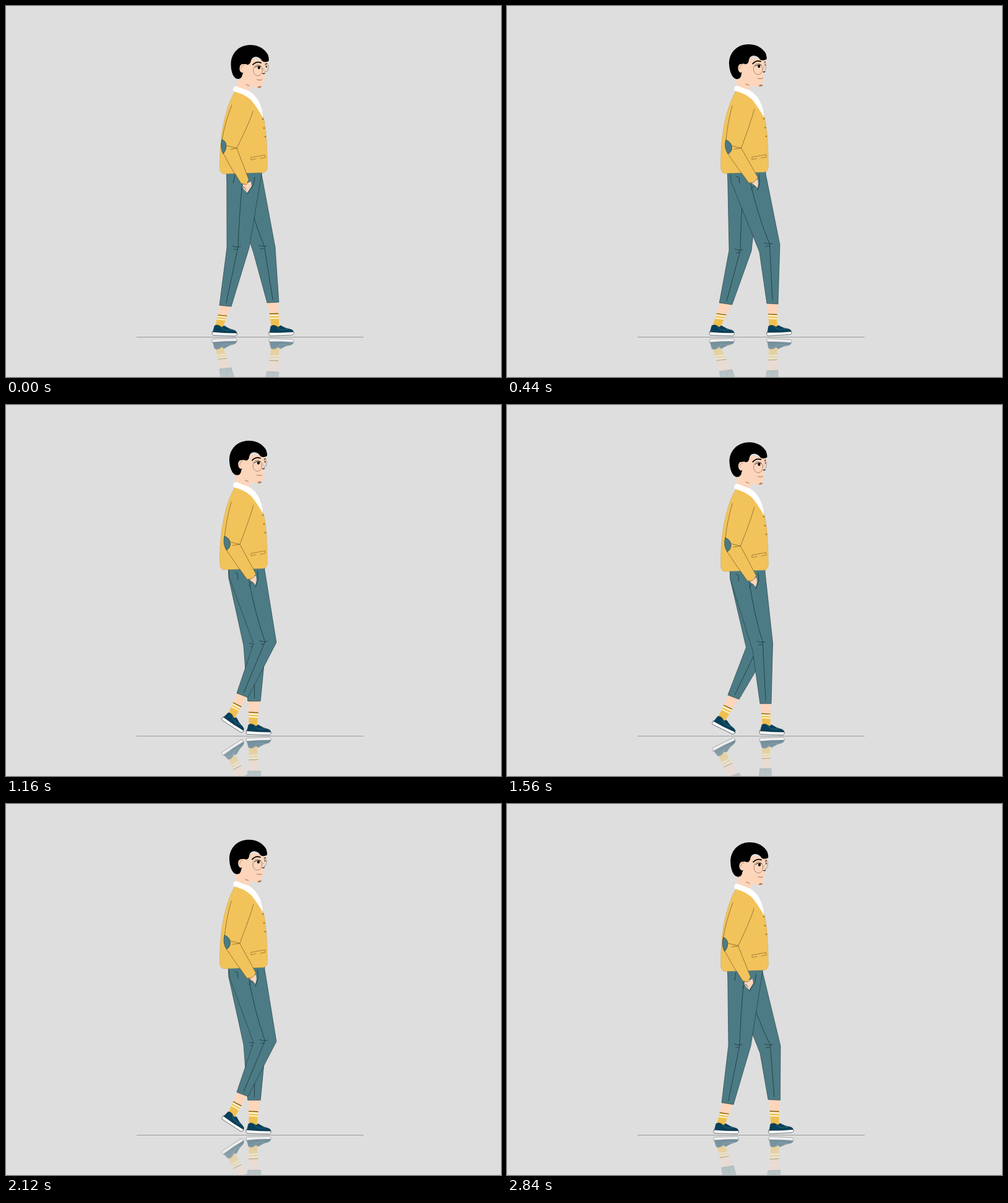
Recreate the animation shown at these times as an HTML page with a canvas. Size 800 by 600 pixels, loop 2880 ms.

```html
<!DOCTYPE html>
<html lang="en">
<head>
<meta charset="utf-8">
<title>Walk cycle</title>
<style>
  html, body { margin: 0; width: 100%; height: 100%; overflow: hidden; background: #dedede; }
  canvas { display: block; width: 800px; height: 600px; }
</style>
</head>
<body>
<canvas id="stage" width="800" height="600"></canvas>
<script>
const ctx = document.getElementById('stage').getContext('2d');
const CYCLE = 960, STEP = 40, GROUND = 535.5;
const COLOR = {
  bg: '#dedede', pants: '#4c7b85', seam: '#1b3439', skin: '#fdd5ba', sock: '#efc04e',
  cream: '#fff3d6', shoe: '#06415b', wool: '#f2c35b', thread: '#73581f', black: '#000'
};

// time, hip back x, hip front x, knee back, knee front, cuff back, cuff front, heel, foot angle
const LEG = [
  [0, 356, 413, 357, 391, 393, 391, 345, 484, 364, 486, 333, 532, 2],
  [120, 360, 417, 385.5, 387, 423, 388, 359.7, 472, 376.4, 479, 337.5, 515.5, 26],
  [200, 360, 418, 400, 386, 437, 384, 373, 466, 391, 473, 348, 508.5, 33],
  [440, 361, 418, 408, 398, 441, 386, 420, 481, 438, 482, 420, 533, -3],
  [480, 360, 418, 399, 394, 434, 385, 420, 483, 437.5, 482, 421.8, 533, -2],
  [600, 360, 417, 397, 397, 429.5, 385, 409, 483, 427, 483, 408, 532, 2],
  [680, 359, 418, 383, 384, 419, 383, 391, 482, 410, 482, 388.6, 532, 2],
  [920, 356, 413, 358, 390, 394, 391, 347, 483, 366, 486, 334, 532, 1.5]
];
// time, arm sway, head tilt
const BODY = [
  [0, 0, 0], [200, 0.88, 2.1], [440, 1, 3.8], [600, 0.8, 3.3], [920, 0.1, 1.9]
];

const mix = (a, b, f) => a + (b - a) * f;
const mixPt = (a, b, f) => [mix(a[0], b[0], f), mix(a[1], b[1], f)];

// Smooth periodic interpolation through unevenly spaced keys
function sample(keys, time) {
  const n = keys.length;
  const t = ((time % CYCLE) + CYCLE) % CYCLE;
  let i = n - 1;
  while (keys[i][0] > t) i--;
  const row = k => keys[(k + n) % n];
  const at = k => row(k)[0] + CYCLE * Math.floor(k / n);
  const slope = (k, c) => {
    const before = at(k) - at(k - 1), after = at(k + 1) - at(k);
    const d0 = (row(k)[c] - row(k - 1)[c]) / before;
    const d1 = (row(k + 1)[c] - row(k)[c]) / after;
    return (before * d1 + after * d0) / (before + after);
  };
  const h = at(i + 1) - at(i), u = (t - at(i)) / h, v = 1 - u;
  return row(i).slice(1).map((a, j) => {
    const c = j + 1, b = row(i + 1)[c];
    return a * (1 + 2 * u) * v * v + b * u * u * (3 - 2 * u)
      + h * (slope(i, c) * u * v * v - slope(i + 1, c) * u * u * v);
  });
}

function paint(path, fill, stroke, width = 0.7) {
  if (fill) { ctx.fillStyle = fill; ctx.fill(path); }
  if (stroke) { ctx.strokeStyle = stroke; ctx.lineWidth = width; ctx.stroke(path); }
}
const shape = (d, fill, stroke, width) => paint(new Path2D(d), fill, stroke, width);
function poly(points, fill, stroke, width, open) {
  const path = new Path2D();
  points.forEach(p => path.lineTo(p[0], p[1]));
  if (!open) path.closePath();
  paint(path, fill, stroke, width);
}
const line = (points, stroke, width) => poly(points, null, stroke, width, true);
function oval(x, y, rx, ry, fill, stroke, width) {
  const path = new Path2D();
  path.ellipse(x, y, rx, ry, 0, 0, Math.PI * 2);
  paint(path, fill, stroke, width);
}

function legPose(time, far) {
  const [hb, hf, kbx, kby, kfx, kfy, cbx, cby, cfx, cfy, hx, hy, angle] = sample(LEG, time);
  const widen = (x, k) => far ? 394 + (x - 394) * k : x;
  const kx = far ? 1 : 0, ky = far ? 5 : 0, cy = far ? -3 : 0;
  return {
    hipBack: hb, hipFront: far ? hf - 5 : hf,
    kneeBack: [kbx + kx, kby + ky], kneeFront: [kfx + kx, kfy + ky],
    cuffBack: [widen(cbx, 1.08), cby + cy], cuffFront: [widen(cfx, 1.08), cfy + cy],
    heel: [widen(hx, 1.116), Math.min(hy, 533)], angle: angle * Math.PI / 180
  };
}

function drawFoot({ heel, angle, cuffBack, cuffFront }) {
  const cos = Math.cos(angle), sin = Math.sin(angle);
  const place = (x, y) => [heel[0] + x * cos - y * sin, heel[1] + x * sin + y * cos];
  const back = place(4.5, -13), front = place(17, -12);
  const top = [mixPt(cuffBack, cuffFront, 0.04), mixPt(cuffBack, cuffFront, 0.92)];
  const band = (a, b, fill) => poly([
    mixPt(top[0], back, a), mixPt(top[1], front, a),
    mixPt(top[1], front, b), mixPt(top[0], back, b)
  ], fill);
  band(-0.05, 1, COLOR.skin);
  band(0.43, 1, COLOR.sock);
  band(0.43, 0.46, COLOR.thread);
  band(0.48, 0.54, COLOR.cream);
  band(0.60, 0.65, COLOR.cream);

  ctx.save();
  ctx.translate(heel[0], heel[1]);
  ctx.rotate(angle);
  shape('M1-4L3.500-15Q8-18 13-14.500L16-13Q19-17 21-14.500Q27-10.500 35-9Q39.500-8 40-4Z', COLOR.shoe, '#0a2433', 0.5);
  shape('M.3-5Q20-3.500 40-4.500Q41 0 37 .4L2 .4Q-1 0 .3-5Z', '#fff', '#1a2c36', 0.6);
  shape('M13-14Q16-8.500 24-8.500L31-9.500', null, '#5f8596', 0.5);
  ctx.restore();
}

function drawLeg(leg, bodyY, sway) {
  const top = 262 + bodyY;
  drawFoot(leg);
  poly([[leg.hipBack, top], [leg.hipBack + 0.8, top + 22], leg.kneeBack, leg.cuffBack,
    leg.cuffFront, leg.kneeFront, [leg.hipFront, top + 10], [leg.hipFront, top]],
    COLOR.pants, COLOR.seam, 0.6);
  const [kx] = mixPt(leg.kneeBack, leg.kneeFront, 0.5), ky = leg.kneeFront[1] - 1;
  const hip = [mix(leg.hipBack, leg.hipFront, 0.45 + 0.13 * sway), 289 + bodyY];
  const cuff = mixPt(leg.cuffBack, leg.cuffFront, 0.52);
  const bow = Math.abs(kx - hip[0]) * 0.1 + 1;
  const crease = new Path2D();
  crease.moveTo(...hip);
  crease.quadraticCurveTo(mix(hip[0], kx, 0.5) - bow, mix(hip[1], ky, 0.52), kx, ky);
  crease.lineTo(...mixPt([kx, ky], cuff, 0.95));
  paint(crease, null, COLOR.seam, 0.8);
  line([[kx - 9, ky - 2], [kx - 2, ky], [kx + 4, ky - 1]], COLOR.seam, 0.8);
  line([[kx - 7, ky + 4], [kx - 1, ky + 3.5]], COLOR.seam, 0.7);
}

function drawHead(tilt) {
  ctx.save();
  ctx.translate(388 - 0.6 * tilt, 128);
  ctx.rotate(-tilt * Math.PI / 180);
  ctx.translate(-388, -128);
  shape('M374 108L373 134L392 142L396 131Z', COLOR.skin);
  shape('M382 84L422 88Q424 97 420 103L418.500 111Q419 116 417 121Q416 131 409 132.500Q400 133 389 126L376 116Z', COLOR.skin);
  shape('M388 127L393 129', null, '#8a5a42', 0.8);
  shape('M375 118Q381 118 382 111L384 106Q378 102 380 96Q385 92 390 95Q395 95 396 88Q398 82 404 82Q411 83 414 89Q419 92 424.500 89Q425.500 86 423.500 79C418 69 408 63 394.500 63C376 63 363.500 77 363.500 94C363.500 107 368 118 375 118Z', COLOR.black);
  oval(382, 101, 4.6, 7, COLOR.skin);
  shape('M385 96Q380 96 380 102', null, '#9b6a50', 0.6);

  // Features slide against the tilt while the far lens narrows
  ctx.translate(0.7 * tilt, 0);
  shape('M399 95Q405 89 412 92', null, COLOR.black, 1.8);
  shape('M402.500 99Q407 95.500 412.500 98', null, COLOR.black, 0.9);
  oval(408.8, 99.8, 2.1, 2.4, COLOR.black);
  oval(407, 104, 7.4, 9, null, '#5b4035', 0.5);
  shape('M415 109Q417 110.500 418 108.500', null, COLOR.black, 1.1);
  shape('M405.500 119Q409 121 413.500 119.500', null, '#8b493b', 0.7);
  shape('M406 131Q410 128.500 413 130Q412 132.500 408 132.500Z', '#a9775a');
  ctx.translate(417, 0);
  ctx.scale(1 - 0.14 * tilt, 1);
  shape('M2 94L5 93', null, COLOR.black, 1.2);
  oval(3.7, 98, 0.9, 1.7, COLOR.black);
  shape('M-2.500 102Q-1 100 .5 102M1 96Q7 90 7 100Q6.500 108 1 106', null, '#5b4035', 0.5);
  ctx.restore();
}

function drawHand(sway) {
  const at = (x0, y0, x1, y1) => [mix(x0, x1, sway), mix(y0, y1, sway)];
  poly([at(383, 288, 393, 285), at(396, 284, 405, 280), at(397, 291, 406, 288),
    at(390, 302, 405, 295), at(382, 294, 398, 289)], COLOR.skin);
  line([at(402, 277, 407, 273), at(400, 289, 408.5, 286), at(390, 304, 405, 299)], COLOR.seam, 0.8);
  line([at(380, 298, 394, 298), at(384, 292, 399, 291), at(388, 297, 402, 293)], COLOR.seam, 0.7);
  line([at(369, 274, 370, 276), at(369, 278, 375, 278), at(367, 286, 376, 287)], COLOR.seam, 0.8);
}

function drawTorso(sway) {
  shape('M370 138C355 164 345 205 345.500 262Q346 271 352 271.500L380 270.500L416 269.500Q422 268 422.500 261C422 230 421 195 415 177C407 158 394 142 370 138Z', COLOR.wool, '#b08a35', 0.3);
  shape('M368 138Q365 131 372 129.500Q383 134 392 137Q405 144 411 160Q415 171 415.500 181Q406 164 396 152Q385 142 368 138Z', '#fff');
  shape('M396 249L396 245L418.500 241L419 245L411 246.500M404 247L397 249', null, COLOR.thread, 0.6);
  [[415, 183], [417, 197.5], [419, 211.5]].forEach(([x, y]) => oval(x, y, 1, 1, '#a98430', COLOR.thread, 0.4));

  const at = (x0, y0, x1, y1) => [mix(x0, x1, sway), mix(y0, y1, sway)];
  const elbow = at(373, 230, 378.5, 230.5);
  const cuffBack = at(380, 287, 391, 287), cuffFront = at(392, 280, 405.5, 278);
  const tip = at(388, 289, 398, 286);
  poly([elbow, at(352, 239, 357, 240), cuffBack, tip, cuffFront], COLOR.wool);
  line([at(351, 238, 357, 240), at(364, 262, 374, 264), cuffBack, tip, at(393, 284, 405, 280)], COLOR.thread);

  const seam = new Path2D();
  seam.moveTo(...at(365, 160, 364, 162));
  seam.quadraticCurveTo(...at(353, 192, 356, 192), ...at(349, 217, 354, 218));
  seam.moveTo(...at(399, 170, 400, 167));
  seam.quadraticCurveTo(...at(396, 183, 394, 189), ...elbow);
  seam.lineTo(...cuffFront);
  seam.moveTo(...at(357, 226, 364, 227));
  seam.lineTo(...elbow);
  seam.moveTo(...at(363, 232, 367, 232));
  seam.lineTo(...elbow);
  paint(seam, null, COLOR.thread);

  const patch = new Path2D(), top = at(349, 216, 353.5, 217.5);
  patch.moveTo(...top);
  patch.bezierCurveTo(...at(358, 219, 365, 220), ...at(358, 231, 367, 236), ...at(351, 239, 357, 240));
  patch.quadraticCurveTo(...at(345.5, 229, 350.5, 230), ...top);
  paint(patch, COLOR.pants, COLOR.seam, 0.6);
}

function draw(time) {
  const [sway, tilt] = sample(BODY, time);
  const bodyY = -2.9 * (1 - Math.cos((time - 15) / CYCLE * 4 * Math.PI));
  const near = legPose(time, false), far = legPose(time + CYCLE / 2, true);
  const legs = () => {
    drawLeg(far, bodyY, 0.4);
    drawLeg(near, bodyY, sway);
  };

  ctx.fillStyle = COLOR.bg;
  ctx.fillRect(0, 0, 800, 600);

  ctx.save();
  ctx.beginPath();
  ctx.rect(0, GROUND, 800, 600 - GROUND);
  ctx.clip();
  ctx.translate(0, GROUND * 2);
  ctx.scale(1, -1);
  legs();
  ctx.restore();
  const fade = ctx.createLinearGradient(0, GROUND, 0, 600);
  fade.addColorStop(0, 'rgba(222,222,222,.46)');
  fade.addColorStop(1, 'rgba(222,222,222,.76)');
  ctx.fillStyle = fade;
  ctx.fillRect(0, GROUND, 800, 65);

  line([[211, GROUND], [577.5, GROUND]], '#999', 1);
  legs();
  ctx.save();
  ctx.translate(0, bodyY);
  drawHand(sway);
  drawHead(tilt);
  drawTorso(sway);
  ctx.restore();
}

ctx.lineJoin = ctx.lineCap = 'round';
function tick() {
  draw(Math.floor(performance.now() / STEP) * STEP % CYCLE);
  requestAnimationFrame(tick);
}
tick();
</script>
</body>
</html>
```
